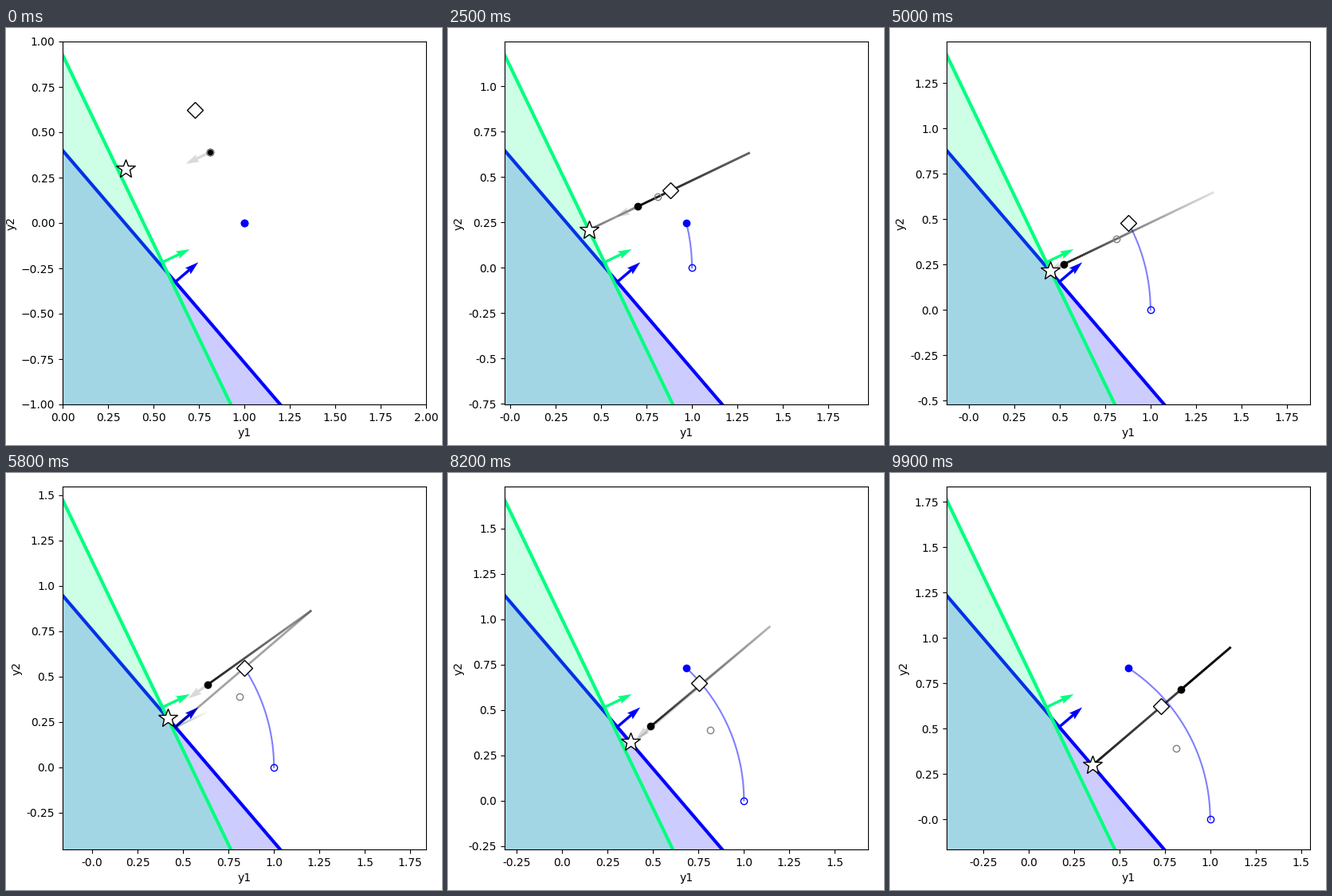
These frames come from a looping animation (547x524 px, 10 s). A matplotlib script:

```python
import numpy as np
import matplotlib.pyplot as plt
from matplotlib.animation import FuncAnimation
from matplotlib.collections import LineCollection

W, H, DPI = 547, 524, 100
FRAMES, STEP, DT = 100, 10, 0.01
N = FRAMES * STEP
THRESH = 0.5
COLORS = ["blue", "springgreen"]
ANGLES = np.array([0.7075, 0.448])
D = np.column_stack([np.cos(ANGLES), np.sin(ANGLES)])
FADE = 100

# Slowly rotating input
theta = 0.1 * DT * np.arange(N)
u = np.column_stack([np.cos(theta), np.sin(theta)])


def simulate():
    """Leaky readout that jumps whenever it crosses a neuron's boundary."""
    y = np.zeros((N, 2))
    spikes = np.zeros((N, 2), bool)
    y[0] = D[1] * (D[1] @ u[0])
    for i in range(1, N):
        y[i] = (1 - DT) * y[i - 1]
        v = D @ (u[i] - y[i])
        k = v.argmax()
        if v[k] > THRESH:
            y[i] += D[k]
            spikes[i, k] = True
    return y, spikes


def min_norm(point, thresh):
    """Smallest y with D y >= D point - thresh."""
    c = D @ point - thresh
    for k in (0, 1):
        p = D[k] * c[k]
        if D[1 - k] @ p >= c[1 - k]:
            return p
    return np.linalg.solve(D, c)


y, spikes = simulate()

fig = plt.figure(figsize=(W / DPI, H / DPI), dpi=DPI)
ax = fig.add_axes([71 / W, 51 / H, 456 / W, 456 / H])
ax.set_xlabel("y1")
ax.set_ylabel("y2")

fills, bounds, normals = [], [], []
for k, color in enumerate(COLORS):
    z = 1 + 0.2 * k
    fills += ax.fill([0], [0], color=color, alpha=0.2, lw=0, zorder=z)
    bounds += ax.plot([], [], color=color, lw=3, zorder=z + 0.1)


def arrow(vec, z, **kw):
    return ax.quiver([0], [0], [vec[0]], [vec[1]], angles="uv", scale=12,
                     scale_units="width", width=0.0075, zorder=z, **kw)


def marker(style, z, **kw):
    return ax.plot([], [], style, zorder=z, **kw)[0]


for k, color in enumerate(COLORS):
    normals.append(arrow(D[k], 2.2, color=color))
pull = arrow(-y[0], 2.25, color="black", alpha=0.15, lw=0)

path, = ax.plot([], [], color="blue", alpha=0.5, lw=1.5, zorder=2.3)
trail = LineCollection([], linewidths=2, zorder=2.4)
ax.add_collection(trail, autolim=False)
u_dot = marker("o", 3, color="blue")
y_dot = marker("o", 3.1, color="black")
u_ring = marker("o", 3.2, color="blue", mfc="none")
y_ring = marker("o", 3.2, color="gray", mfc="none")
u_ring.set_data([u[0, 0]], [u[0, 1]])
y_ring.set_data([y[0, 0]], [y[0, 1]])
diamond = marker("D", 4, mfc="white", mec="black", ms=10)
star = marker("*", 5, mfc="white", mec="black", ms=18)


def place(artist, p):
    artist.set_data([p[0]], [p[1]])


def set_ticks(axis, lo, first):
    ticks = np.arange(np.ceil(lo * 4) / 4, lo + 2 + 1e-9, 0.25)
    if first:
        labels = [f"{t:.2f}".replace("-", "\u2212") for t in ticks]
    else:
        labels = [str(float(t)) for t in ticks]
    axis.set_ticks(ticks, labels=labels)


def draw(frame):
    i = max(frame * STEP - 1, 0)
    c = u[i]

    set_ticks(ax.xaxis, c[0] - 1, frame == 0)
    set_ticks(ax.yaxis, c[1] - 1, frame == 0)
    ax.set_xlim(c[0] - 1, c[0] + 1)
    ax.set_ylim(c[1] - 1, c[1] + 1)

    recent = spikes[max(i + 1 - STEP, 0):i + 1].any(axis=0)
    for k in (0, 1):
        n = D[k]
        base = c - THRESH * n
        along = 4 * np.array([-n[1], n[0]])
        a, b = base + along, base - along
        fills[k].set_xy([a, b, b - 6 * n, a - 6 * n])
        bounds[k].set_data([a[0], b[0]], [a[1], b[1]])
        bounds[k].set_linewidth(10 if recent[k] else 3)
        normals[k].set_offsets([base])

    pull.set_offsets([y[i]])
    pull.set_UVC([-y[i, 0]], [-y[i, 1]])

    # Readout history fades out over one second
    pts = y[max(i - FADE, 0):i + 1]
    segs = np.stack([pts[:-1], pts[1:]], axis=1)
    age = np.arange(len(segs))[::-1]
    rgba = np.zeros((len(segs), 4))
    rgba[:, 3] = 1 - age / FADE
    trail.set_segments(segs)
    trail.set_color(rgba)

    path.set_data(u[:i + 1, 0], u[:i + 1, 1])
    place(u_dot, c)
    place(y_dot, y[i])
    # Index -1 wraps to the last sample on the opening frame
    goal = u[frame * STEP - 1]
    place(diamond, min_norm(goal, 0))
    place(star, min_norm(goal, THRESH))
    return []


anim = FuncAnimation(fig, draw, frames=FRAMES, interval=100, repeat=True,
                     repeat_delay=0, init_func=lambda: draw(0), blit=False)
plt.show()
```
